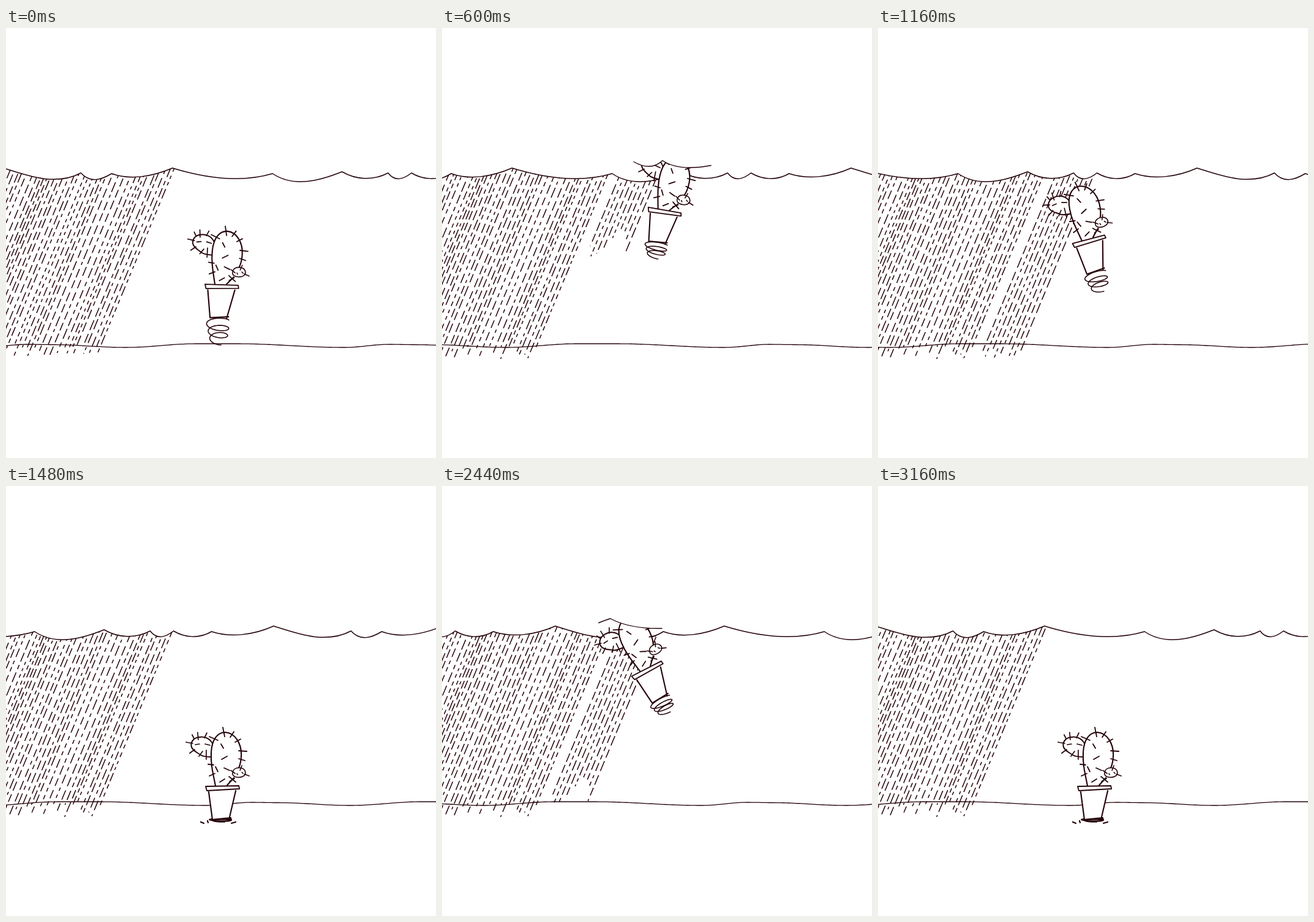
Animation, 700 px wide and 700 px high, one loop 3200 ms. Source, as an HTML page with a canvas:

```html
<!DOCTYPE html>
<html lang="en">
<head>
<meta charset="utf-8">
<title>Cactus in the rain</title>
<style>
html, body { margin: 0; width: 100%; height: 100%; overflow: hidden; background: #fff; }
canvas { display: block; width: 700px; height: 700px; }
</style>
</head>
<body>
<canvas id="stage" width="700" height="700"></canvas>
<script>
const ctx = document.getElementById('stage').getContext('2d');
const INK = '#240309';
const FRAME = 40, FRAMES = 80, HOP = 40;

// x, y of each cloud tip, then the heights of the two handles to the next tip
const CLOUD = [
  [122, 236, 253, 247], [172, 237, 248, 242], [271, 228, 243, 253],
  [434, 237, 260, 249], [547, 234, 247, 249], [622, 236, 251, 246],
  [660, 236, 247, 249], [722, 237, 247, 243], [823, 228, 240, 258]
];
const CLOUD_WIDTH = 827;

const GROUND = [[195, 520], [310, 514], [375, 514], [550, 520], [625, 515], [665, 515.5], [785, 520]];
const GROUND_WIDTH = 590;

// hop step, rim x, rim y, tilt in degrees, spring length
const POSES = [
  [-1, 352, 488, 0, 6], [0, 351, 417.5, 3, 46], [11, 357.5, 319, 10.7, 31],
  [15, 362.5, 296, 10.7, 28], [21, 332.5, 297, -26, 28], [29, 342.5, 343.5, -13.8, 36],
  [37, 352, 488, 0, 6], [39, 352, 488, 0, 6]
];

// Plant parts, drawn around the rim centre at (352, 488)
const ARM = new Path2D('M336 419C331 410 322 407 313 409C304 411 300 418 302 425C305 432 312 434 317 438C322 441 328 441 335 441');
const BODY = new Path2D('M341 488C337 468 333 452 334 434C335 413 344 401 357 401C373 402 383 419 383 437C383 447 381 455 378 461M371 475L360 487');
const BODY_FILL = new Path2D('M341 488C337 468 333 452 334 434C335 413 344 401 357 401C373 402 383 419 383 437C383 455 376 474 360 488Z');
const BUD = new Path2D('M369 466C370 460 376 458 382 459C389 460 391 466 389 470C385 475 377 475 372 473C369 471 368 469 369 466Z');
const ARM_SPIKES = new Path2D('M312 401L313 413M303 405L306 411M293 417L304 419M307 429L299 435M320 432L314 440M327 402L323 410M331 408L345 414M326 430L326 445M308 421L315 420M324 420L332 422');
const BODY_SPIKES = new Path2D('M353 393L356 408M371 400L365 409M382 412L373 417M379 431L392 432M379 444L389 447M329 453L338 454M331 472L340 468M350 420L354 427M351 445L360 440M341 457L345 465M355 459L364 463M348 482L356 477M363 473L374 482M364 481L372 476');
const BUD_SPIKES = new Path2D('M384 455L381 463M388 469L396 472M366 463L373 468M376 468L377 470M384 466L386 468');
const POT = new Path2D('M330 496L336 543L364 541L374 496Z');
const POT_LINES = new Path2D('M330 498L336 543L366 540M374 496L363 543');
const RIM = new Path2D('M325 489L379 488L380 493L327 496Z');
const DUST = new Path2D('M317 547L322 549M328 545L329 548M367 549L374 547');

const lerp = (a, b, k) => a + (b - a) * k;

function random(seed) {
  let s = Math.imul(seed + 1, 0x9e3779b1);
  return () => {
    s = s + 0x6d2b79f5 | 0;
    let t = Math.imul(s ^ (s >>> 15), s | 1);
    t ^= t + Math.imul(t ^ (t >>> 7), t | 61);
    return ((t ^ (t >>> 14)) >>> 0) / 4294967296;
  };
}

function line(path, width) {
  ctx.lineWidth = width;
  ctx.stroke(path);
}

function shape(path, width) {
  ctx.fill(path);
  line(path, width);
}

// Smooth curve through the poses
function poseAt(step) {
  let i = 1;
  while (i < POSES.length - 2 && step >= POSES[i + 1][0]) i++;
  const a = POSES[i], b = POSES[i + 1], before = POSES[i - 1], after = POSES[i + 2] || b;
  const span = b[0] - a[0], k = (step - a[0]) / span;
  return a.slice(1).map((v, n) => {
    const c = n + 1;
    const ma = (b[c] - before[c]) / (b[0] - before[0]) * span;
    const mb = (after[c] - a[c]) / (after[0] - a[0]) * span;
    const k2 = k * k, k3 = k2 * k;
    return (2 * k3 - 3 * k2 + 1) * v + (k3 - 2 * k2 + k) * ma
      + (3 * k2 - 2 * k3) * b[c] + (k3 - k2) * mb;
  });
}

function cloudPath(shift) {
  const path = new Path2D();
  for (let n = -1; n < 3; n++) {
    CLOUD.forEach(([x, y, h1, h2], i) => {
      const next = CLOUD[(i + 1) % CLOUD.length];
      const x0 = x + n * CLOUD_WIDTH - shift;
      const x1 = next[0] + (i + 1 === CLOUD.length ? n + 1 : n) * CLOUD_WIDTH - shift;
      if (n === -1 && !i) path.moveTo(x0, y);
      path.bezierCurveTo(lerp(x0, x1, 0.3), h1, lerp(x0, x1, 0.67), h2, x1, next[1]);
    });
  }
  return path;
}

function groundPath(shift) {
  const path = new Path2D();
  for (let x = -4; x <= 704; x += 4) {
    const u = 195 + (((x + shift - 195) % GROUND_WIDTH) + GROUND_WIDTH) % GROUND_WIDTH;
    const i = GROUND.findIndex(p => p[0] > u);
    const [x0, y0] = GROUND[i - 1], [x1, y1] = GROUND[i];
    path.lineTo(x, lerp(y0, y1, (1 - Math.cos(Math.PI * (u - x0) / (x1 - x0))) / 2));
  }
  return path;
}

// Some streaks are mostly long dashes, others mostly short ones
function streak(x, top, bottom, rnd) {
  const at = y => x - (y - 238) * 0.415;
  const long = rnd() < 0.6;
  const dashes = [];
  for (let i = 0; i < 6; i++) {
    const big = rnd() < (long ? 0.75 : 0.25);
    dashes.push(big ? 13 + rnd() * 5 : 5 + rnd() * 3, 5 + rnd() * 2.5);
  }
  ctx.setLineDash(dashes);
  ctx.lineDashOffset = rnd() * 80;
  ctx.beginPath();
  ctx.moveTo(at(top), top);
  ctx.lineTo(at(bottom), bottom);
  ctx.stroke();
}

function rain(step, cloud) {
  const drawing = Math.floor(step / 4) % 2;
  const under = new Path2D(cloud);
  under.lineTo(2500, 700);
  under.lineTo(-900, 700);
  under.closePath();
  ctx.save();
  ctx.clip(under);
  ctx.lineCap = 'butt';
  ctx.lineWidth = 1.5;
  const gap = random(5);
  for (let x = 270, i = 0; x > 0; x -= 5 + gap() * 6, i++) {
    const rnd = random(i * 2 + drawing + 3);
    streak(x, 225, 514 + rnd() * (drawing ? 26 : 21), rnd);
  }
  // A second sheet, knocked loose by the bump
  if (step > 11 && step < 37) {
    const top = 225 + Math.max(0, step - 29) * 38;
    for (let i = 0; i < 9; i++) {
      const rnd = random(i * 2 + drawing + 101);
      const front = 250 + (step - 11) * 24.5 + (random(i + 300)() - 0.5) * 50;
      const bottom = Math.min(front, 515 + rnd() * 25);
      if (bottom > top) streak(290 + i * 7.7, top, bottom, rnd);
    }
  }
  ctx.restore();
}

// Piece of cloud lifted by the plant's head
function capPath(step) {
  const k = (step - 15) / 6;
  const peak = 209 + 0.75 * (step - 18) ** 2;
  const x = (a, b) => lerp(a, b, k), y = (a, b) => peak + lerp(a, b, k);
  const path = new Path2D();
  path.moveTo(x(312, 255), y(2, 7));
  path.quadraticCurveTo(x(340, 265), y(18, 3), x(359, 274), peak);
  path.quadraticCurveTo(x(385, 305), y(18, 17), x(438, 358), y(8, 16));
  return path;
}

function spring(length) {
  const path = new Path2D();
  const ry = 1 + length * 0.13, turns = 2.75;
  const pitch = (length - 2 * ry) / turns;
  for (let a = 0; a <= turns; a += 0.02) {
    const r = 19.5 - a * 2.2, turn = a * 2 * Math.PI + 0.4;
    path.lineTo(349 + a + r * Math.cos(turn), 541 + ry + a * pitch - ry * Math.sin(turn));
  }
  line(path, 1.6);
}

function plant([x, y, tilt, length]) {
  ctx.save();
  ctx.translate(x, y);
  ctx.rotate(tilt * Math.PI / 180);
  ctx.translate(-352, -488);
  spring(length);
  shape(ARM, 2);
  ctx.fill(BODY_FILL);
  line(BODY, 2.1);
  shape(BUD, 1.6);
  line(ARM_SPIKES, 1.7);
  line(BODY_SPIKES, 1.8);
  line(BUD_SPIKES, 1.6);
  ctx.fill(POT);
  line(POT_LINES, 2.1);
  shape(RIM, 1.8);
  ctx.restore();
}

function draw() {
  const frame = Math.floor(performance.now() / FRAME) % FRAMES;
  const step = frame % HOP;
  const cloud = cloudPath(CLOUD_WIDTH * frame / (FRAMES - 1));
  ctx.clearRect(0, 0, 700, 700);
  ctx.fillStyle = '#fff';
  ctx.strokeStyle = INK;
  ctx.lineCap = ctx.lineJoin = 'round';

  rain(step, cloud);
  line(cloud, 1.5);
  line(groundPath(step * 6.06), 1.3);

  const cap = step >= 13 && step <= 23 && capPath(step);
  ctx.save();
  if (cap) {
    const below = new Path2D(cap);
    below.lineTo(700, 230);
    below.lineTo(700, 700);
    below.lineTo(0, 700);
    below.lineTo(0, 225);
    below.closePath();
    ctx.clip(below);
  }
  plant(poseAt(step));
  ctx.restore();
  if (cap) line(cap, 1.4);
  if (step >= 37) line(DUST, 2.2);

  requestAnimationFrame(draw);
}
draw();
</script>
</body>
</html>
```
